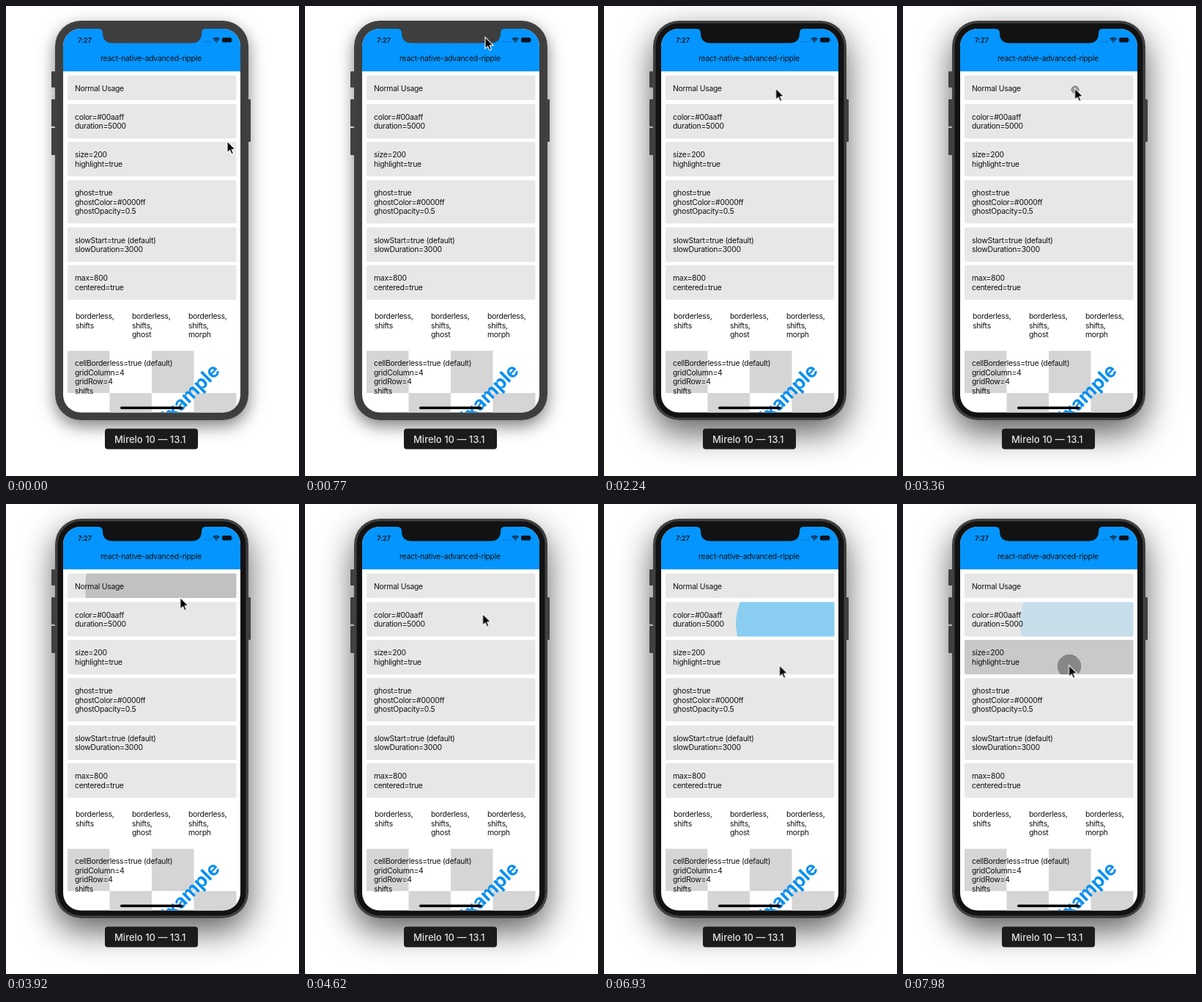
An HTML page for the animation above (8 s loop, 400x640 px).

```html
<!DOCTYPE html>
<html lang="en">
<head>
<meta charset="utf-8">
<title>Ripple demo</title>
<style>
  html, body { margin: 0; width: 100%; height: 100%; overflow: hidden; background: #fff; }
  .stage { position: relative; width: 400px; height: 640px; overflow: hidden; }
  svg { position: absolute; left: 0; top: 0; }
  text { font-family: Inter, "Liberation Sans", sans-serif; white-space: pre; }
  .ui text { font-size: 10.4px; letter-spacing: -.26px; fill: #111; }

  /* the window gains focus: deeper shadow, darker bezel */
  .shadow { position: absolute; left: 67px; top: 20px; width: 264px; height: 544px; border-radius: 35px; }
  .idle { box-shadow: 0 8px 22px rgba(0, 0, 0, .5); animation: hide 8s step-end infinite; }
  .focused { box-shadow: 0 17px 46px rgba(0, 0, 0, .64); animation: show 8s step-end infinite; }
  .bezel { fill: #121212; animation: darken 8s step-end infinite; }
  @keyframes hide { 0% { opacity: 1; } 12.25%, 100% { opacity: 0; } }
  @keyframes show { 0% { opacity: 0; } 12.25%, 100% { opacity: 1; } }
  @keyframes darken { 0% { fill: #3e3e3e; } 12.25%, 100% { fill: #121212; } }

  .ripple { transform-box: fill-box; transform-origin: center; }
  .tap { animation: tap-spread 8s linear infinite; }
  .long { animation: long-grow 8s linear infinite, long-fade 8s linear infinite; }
  .sized { animation: sized-grow 8s linear infinite; }
  .highlight { animation: highlight-in 8s linear infinite; }

  /* slow growth while pressed, then a quick spread on release */
  @keyframes tap-spread {
    0%, 40.37% { transform: scale(0); opacity: 0; }
    40.375% { transform: scale(0); opacity: .36; }
    42.4% { transform: scale(.07); opacity: .36; animation-timing-function: cubic-bezier(.333, .667, .667, 1); }
    48% { transform: scale(1.2); opacity: .2; }
    54%, 100% { transform: scale(1.6); opacity: 0; }
  }
  @keyframes long-grow {
    0%, 66.375% { transform: scale(0); animation-timing-function: cubic-bezier(.333, .582, .667, .915); }
    100% { transform: scale(.921); }
  }
  @keyframes long-fade {
    0%, 66.375% { opacity: .34; }
    73.5% { opacity: .36; }
    86.6% { opacity: .41; }
    100% { opacity: .14; }
  }
  @keyframes sized-grow {
    0%, 95% { transform: scale(0); opacity: .33; }
    100% { transform: scale(.17); opacity: .33; }
  }
  @keyframes highlight-in {
    0%, 95% { opacity: 0; }
    97%, 100% { opacity: .13; }
  }

  .cursor { animation: move 8s ease-in-out infinite; }
  @keyframes move {
    0%, 1% { transform: translate(302px, 184px); }
    10.5%, 17.5% { transform: translate(245px, 40px); }
    24.5%, 45% { transform: translate(234.5px, 112px); }
    54%, 59% { transform: translate(242.5px, 149.5px); }
    64%, 67.5% { transform: translate(251px, 161px); }
    72.6%, 74% { transform: translate(237.5px, 216.5px); }
    77%, 88% { transform: translate(239.5px, 219.5px); }
    93.5%, 100% { transform: translate(226.5px, 219.5px); }
  }
</style>
</head>
<body>
<div class="stage">
  <div class="shadow idle"></div>
  <div class="shadow focused"></div>
  <svg width="400" height="640" viewBox="0 0 400 640">
    <defs>
      <clipPath id="screen"><rect x="78" y="31" width="242" height="522.5" rx="24"/></clipPath>
      <clipPath id="card1"><rect x="84" y="94.5" width="230.5" height="33.5" rx="2"/></clipPath>
      <clipPath id="card2"><rect x="84" y="133.5" width="230.5" height="47" rx="2"/></clipPath>
      <clipPath id="card3"><rect x="84" y="185" width="230.5" height="47" rx="2"/></clipPath>
    </defs>

    <g fill="#404040">
      <rect x="62" y="89" width="7" height="22" rx="1"/>
      <rect x="62" y="127" width="7" height="37" rx="1"/>
      <rect x="62" y="166" width="7" height="37" rx="1"/>
      <rect x="329" y="127" width="5" height="58" rx="1"/>
      <rect x="67" y="20" width="264" height="544" rx="35"/>
    </g>
    <rect class="bezel" x="70.5" y="23.5" width="257" height="537" rx="31.5"/>

    <g clip-path="url(#screen)" class="ui">
      <rect x="78" y="31" width="242" height="523" fill="#fff"/>
      <rect x="78" y="31" width="242" height="58" fill="#0495ff"/>
      <text x="129" y="75">react-native-advanced-ripple</text>

      <g id="cards" fill="#e7e7e7"></g>
      <path d="M84 469.5h57.5V527H84zM199 469.5h57.5V527H199zM141.5 527H199v30h-57.5zM256.5 527h58v30h-58z" fill="#d5d5d5"/>
      <text transform="translate(293.5 498) rotate(-45)" text-anchor="end"
            style="font-size:26px;font-weight:700;letter-spacing:0;fill:#0a8fee">Example</text>

      <g clip-path="url(#card1)"><circle class="ripple tap" cx="235" cy="114" r="100"/></g>
      <g clip-path="url(#card2)"><circle class="ripple long" cx="252" cy="162.5" r="100" fill="#0af"/></g>
      <g clip-path="url(#card3)">
        <rect class="highlight" x="84" y="185" width="231" height="47"/>
        <circle class="ripple sized" cx="227" cy="221" r="100"/>
      </g>
      <g id="labels"></g>

      <rect x="156" y="545.5" width="85.5" height="3.5" rx="1.75" fill="#000"/>
      <path class="bezel" d="M126 30.5h146v.5q-5 0-5 6q0 13.5-14 13.5H146q-14 0-14-13.500q0-6-6-6z"/>
    </g>

    <text x="98" y="50" font-size="9.5" font-weight="600" letter-spacing="-.2" fill="#071a2c">7:27</text>
    <g fill="#0560a5">
      <circle cx="271" cy="48.5" r=".8"/><circle cx="274" cy="48.5" r=".8"/>
      <circle cx="277" cy="48.5" r=".8"/><circle cx="280" cy="48.5" r=".8"/>
    </g>
    <g fill="none" stroke="#071a2c" stroke-width="1.5">
      <path d="M282.8 45.2q4.4-3.6 8.8 0M284.5 47.2q2.7-2.2 5.4 0"/>
      <path d="M286.3 48.9h1.8" stroke-width="1.8"/>
    </g>
    <rect x="295" y="43" width="13" height="6.5" rx="1.8" fill="#06121e"/>
    <rect x="308.6" y="45" width="1" height="2.5" rx=".5" fill="#06507f"/>

    <rect x="135" y="575.5" width="127" height="28" rx="4" fill="#1b1b1b"/>
    <text x="148" y="594.5" font-size="13" font-weight="500" fill="#e2e2e2">Mirelo 10 — 13.1</text>

    <path class="cursor" d="M0 0V15.8L3.6 12.4L6 17.8L8.5 16.7L6.2 11.4H11.2Z" stroke="#fff" stroke-width="1.1"/>
  </svg>
</div>
<script>
  const NS = "http://www.w3.org/2000/svg";
  const add = (id, tag, attrs, content = "") => {
    const el = document.createElementNS(NS, tag);
    for (const key in attrs) el.setAttribute(key, attrs[key]);
    el.textContent = content;
    document.getElementById(id).append(el);
  };
  const label = (x, y, lines) =>
    lines.split("|").forEach((line, i) => add("labels", "text", { x, y: y + i * 12.5 }, line));

  const cards = [
    [94.5, 33.5, "Normal Usage"],
    [133.5, 47, "color=#00aaff|duration=5000"],
    [185, 47, "size=200|highlight=true"],
    [237, 59, "ghost=true|ghostColor=#0000ff|ghostOpacity=0.5"],
    [301.5, 47, "slowStart=true (default)|slowDuration=3000"],
    [353, 47, "max=800|centered=true"]
  ];
  for (const [y, height, lines] of cards) {
    add("cards", "rect", { x: 84, y, width: 230.5, height, rx: 2 });
    label(94, y + 21, lines);
  }
  label(95, 426, "borderless,|shifts");
  label(172, 426, "borderless,|shifts,|ghost");
  label(249, 426, "borderless,|shifts,|morph");
  label(94, 490.3, "cellBorderless=true (default)|gridColumn=4|gridRow=4|shifts");
</script>
</body>
</html>
```
